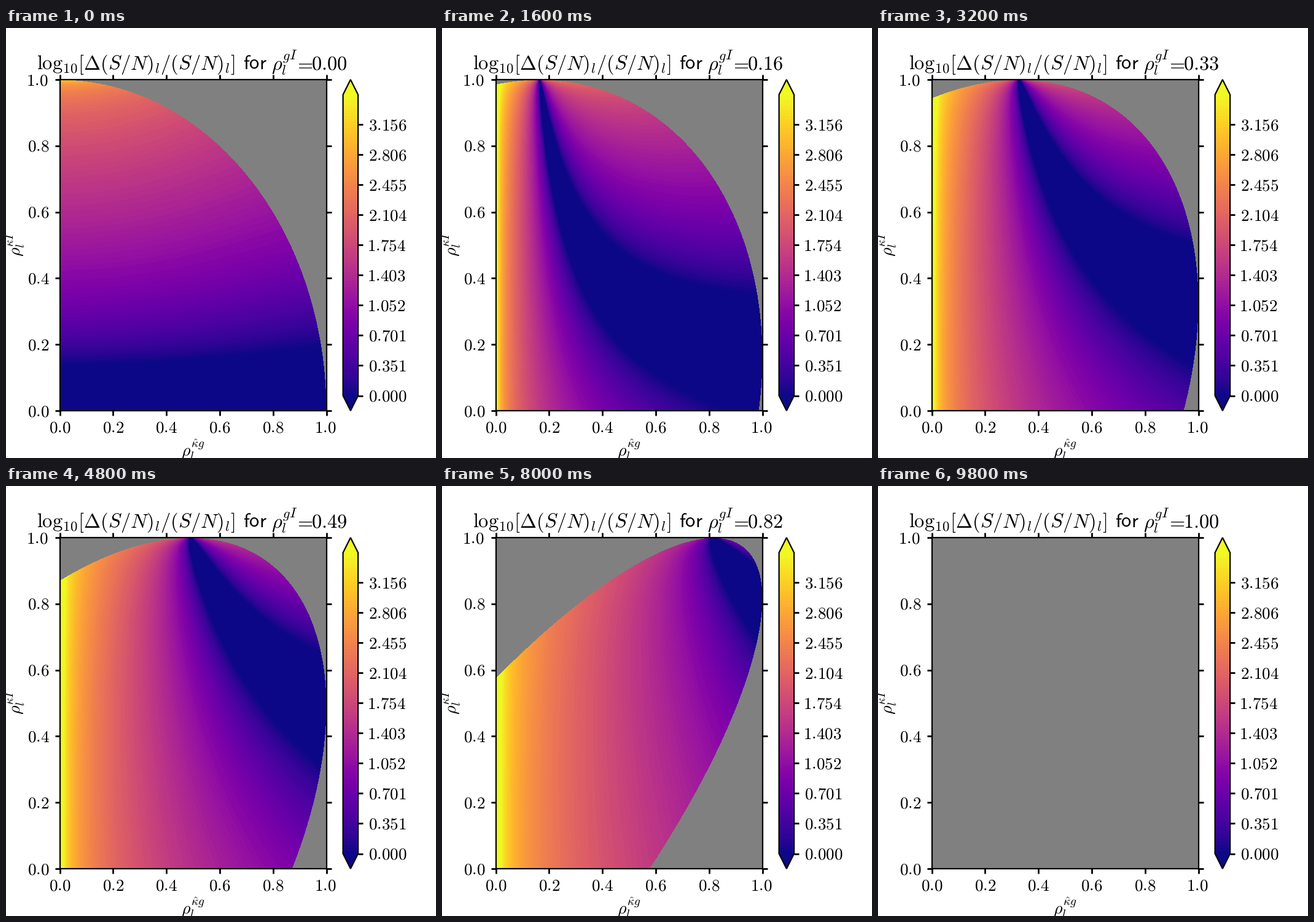
Animation, 700 px wide and 700 px high, one loop 10 s. Source, as a matplotlib script:

```python
import numpy as np
import matplotlib.pyplot as plt
from matplotlib.animation import FuncAnimation
from matplotlib.colors import ListedColormap, Normalize

plt.rcParams["mathtext.fontset"] = "cm"
plt.rcParams["text.hinting"] = "none"

SIZE, DPI = 700, 200
FRAMES, INTERVAL = 50, 200
VMAX, STEP, BANDS = 3.507, 0.35071, 100
W, H = 434, 539

fig = plt.figure(figsize=(SIZE / DPI, SIZE / DPI), dpi=DPI, facecolor="white")


def label(x, y, text, size=9.75, **kw):
    """Math text with its baseline at pixel (x, y), measured from the top left."""
    kw.setdefault("va", "baseline")
    return fig.text(x / SIZE, 1 - y / SIZE, f"${text}$", fontsize=size, **kw)


def number(x, y, text, **kw):
    # a leading 1 has a wide side bearing
    label(x - 2 * text.startswith("1"), y, text, **kw)


plasma = plt.get_cmap("plasma")
cmap = ListedColormap(plasma((np.arange(BANDS) + 0.5) / BANDS))
cmap.set_under(plasma(0.0))
cmap.set_over(plasma(1.0))
cmap.set_bad("#808080")

# correlations at cell centres and cell corners: a = kappa-g, b = kappa-I
a, b = np.meshgrid((np.arange(W) + 0.5) / W, (np.arange(H) + 0.5) / H)
corner_a, corner_b = np.meshgrid(np.linspace(0, 1, W + 1), np.linspace(0, 1, H + 1))


def allowed(c):
    """Cells whose four corners all give a valid correlation matrix."""
    x, y = corner_a, corner_b
    ok = 1 - x**2 - y**2 - c**2 + 2 * x * y * c > -1e-9
    return ok[1:, 1:] & ok[1:, :-1] & ok[:-1, 1:] & ok[:-1, :-1] & (c < 1)


def gain(c):
    """log10 of the percent gain in S/N, masked where it is impossible."""
    r2 = a**2 + (c - a * b) ** 2 / (1 - b**2)
    ratio = np.sqrt(r2 / (1 + r2) * (1 + a**2) / a**2)
    value = np.log10(np.maximum(100 * (ratio - 1), 1e-9))
    return np.ma.masked_where(~allowed(c), value)


ax = fig.add_axes([0.125, 0.11, 0.62, 0.77], facecolor="#808080")
image = ax.imshow(gain(0), cmap=cmap, norm=Normalize(0, VMAX), origin="lower",
                  extent=(0, 1, 0, 1), aspect="auto", interpolation="nearest")
ticks = np.linspace(0, 1, 6)
ax.set_xticks(ticks)
ax.set_yticks(ticks)
ax.tick_params(length=3, width=1, top=True, right=True,
               labelbottom=False, labelleft=False)

cax = fig.add_axes([0.78375, 0.11, 0.035, 0.77])
bar = fig.colorbar(image, cax=cax, extend="both", extendfrac=0.05,
                   ticks=np.arange(10) * STEP)
bar.ax.tick_params(length=3, width=1, labelright=False)
bar.ax.minorticks_off()

for t in ticks:
    number(87.5 + 434 * t, 658, f"{t:.1f}", ha="center")
    number(70.5, 632 - 539 * t, f"{t:.1f}", ha="right")
for i in range(10):
    number(590, 607.5 - 49 * i, f"{i * STEP:.3f}")

label(304, 697, r"\rho_l^{\hat{\kappa}g}", 10.1, ha="center")
label(24, 372.5, r"\rho_l^{\hat{\kappa}I}", 10.1, rotation=90, rotation_mode="anchor")

TITLE = 11.7
label(50, 68, r"\mathrm{log}_{10}[\Delta(S/N)_l/(S/N)_l]", TITLE)
label(386, 68, r"\mathsf{for}", TITLE)
label(432.5, 68, r"\rho_l^{gI}", TITLE)
label(485, 68, "=", TITLE, ha="center")
value = label(497, 68, r"\mathsf{0.00}", TITLE)


def update(frame):
    c = frame / (FRAMES - 1)
    image.set_data(gain(c))
    value.set_text(rf"$\mathsf{{{c:.2f}}}$")
    return image, value


anim = FuncAnimation(fig, update, frames=FRAMES, interval=INTERVAL,
                     repeat=True, repeat_delay=0, blit=False)
plt.show()
```
